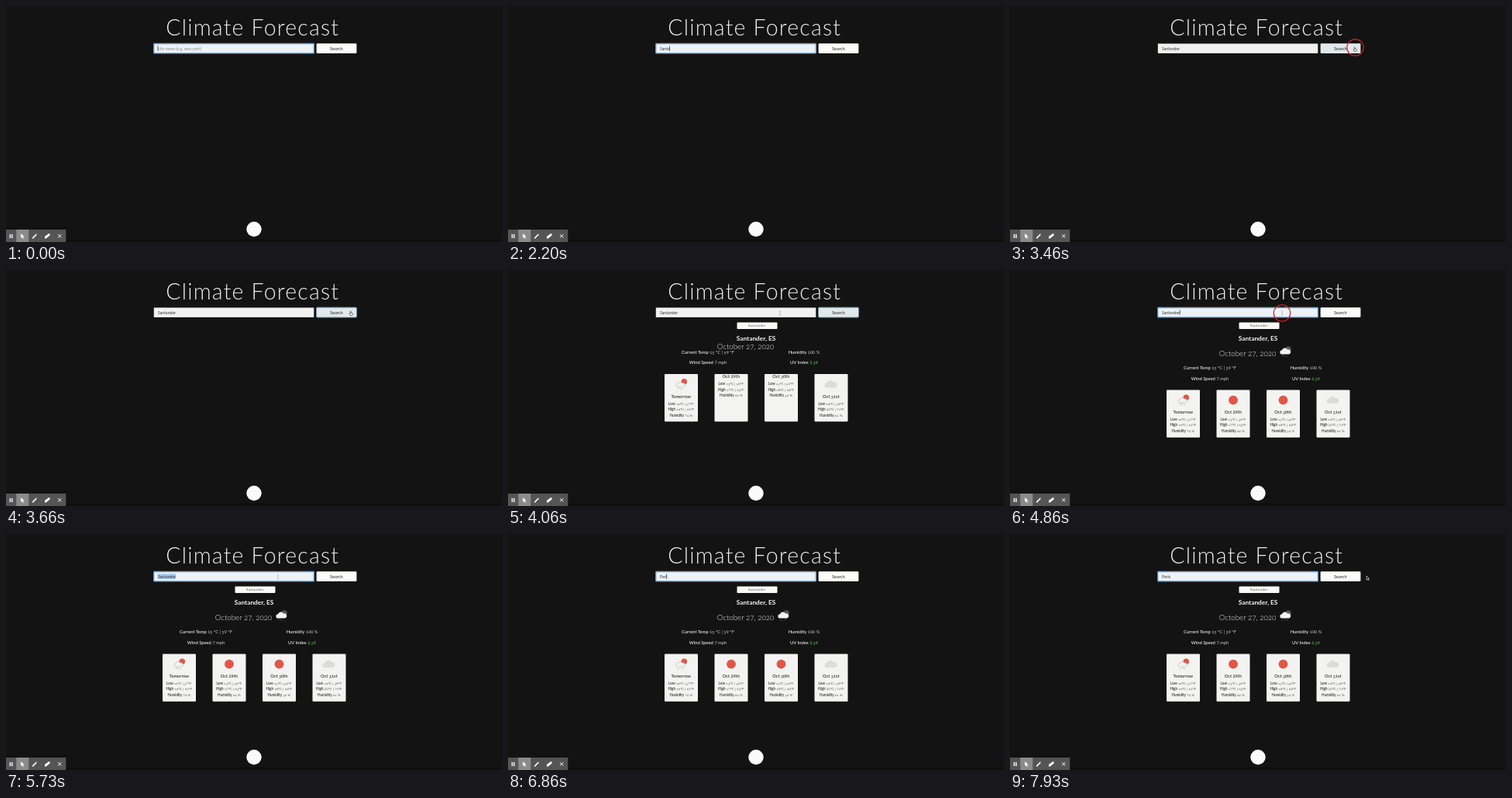
Write an HTML page that moves like this. It is 640 px wide and 304 px high and loops after 8 s.

```html
<!DOCTYPE html>
<html lang="en">
<head>
<meta charset="utf-8">
<title>Climate Forecast</title>
<style>
html, body { margin: 0; height: 100%; overflow: hidden; background: #121312; }
svg { display: block; width: 100vw; height: 100vh; font-family: Lato, "Open Sans", sans-serif; font-variant-numeric: oldstyle-nums; }
</style>
</head>
<body>
<svg id="stage" viewBox="0 0 640 304"></svg>
<script>
const LOOP = 8000;
const stage = document.getElementById('stage');
const pen = document.createElement('canvas').getContext('2d');

const typing = [
  [0, ''], [1130, 'S'], [1600, 'Sa'], [1800, 'San'], [2000, 'Sant'], [2200, 'Santa'],
  [2330, 'Santan'], [2400, 'Santand'], [2600, 'Santande'], [2730, 'Santander'],
  [6130, 'P'], [6400, 'Pa'], [6600, 'Par'], [6800, 'Pari'], [7000, 'Paris']
];
const caretOn = [[0, 200], [730, 3130], [4730, 5130], [6130, 7400]];
const clicks = [[3460, 3660, 445.5, 53.5], [4730, 5000, 351, 55.5], [5130, 5400, 351, 55.5]];
const path = [[2600, 489, 37], [2900, 474, 44], [3200, 448, 55], [3400, 445, 55.5],
  [3660, 445, 55.5], [4060, 351, 55.5], [7200, 351, 55.5], [7800, 461, 56], [8000, 461, 56]];
const days = [
  ['Tomorrow', '14ºC | 57ºF', '16ºC | 61ºF', 74],
  ['Oct 29th', '13ºC | 56ºF', '17ºC | 63ºF', 64],
  ['Oct 30th', '13ºC | 56ºF', '18ºC | 64ºF', 56],
  ['Oct 31st', '14ºC | 58ºF', '22ºC | 71ºF', 61]
];

const within = (t, [a, b]) => t >= a && t < b;
const latest = (list, t) => list.filter(k => k[0] <= t).pop();
const rect = (x, y, w, h, fill, more = '') =>
  `<rect x="${x}" y="${y}" width="${w}" height="${h}" fill="${fill}" ${more}/>`;
const circle = (x, y, r, fill, more = '') => `<circle cx="${x}" cy="${y}" r="${r}" fill="${fill}" ${more}/>`;
const text = (x, y, size, fill, body, more = 'text-anchor="middle"') =>
  `<text x="${x}" y="${y}" font-size="${size}" fill="${fill}" ${more}>${body}</text>`;
const pair = (label, value, fill) =>
  `<tspan font-weight="500">${label}</tspan> <tspan fill="${fill}">${value}</tspan>`;
const at = (x, y, body) => `<g transform="translate(${x} ${y})">${body}</g>`;
const shape = (d, fill, more = '') => `<path d="${d}" fill="${fill}" ${more}/>`;
const cloud = (fill, more) => shape('M-4.5 3.5a2.6 2.6 0 0 1 0-5.2a3.8 3.8 0 0 1 7-.8a3 3 0 0 1 2 6z', fill, more);

function rain(t, color) {
  let out = '';
  for (let i = 0; i < 3; i++) {
    const p = (t / 800 + i / 3) % 1, x = -3 + i * 3 - p, y = 3.8 + p * 2.4;
    out += shape(`M${x} ${y}l-.6 1.5`, 'none', `stroke="${color}" stroke-width=".7" opacity="${1 - p * .6}"`);
  }
  return out;
}

const showers = t => circle(4, -3.7, 3.8, '#df5748') +
  `<g transform="translate(-.5 .3) scale(.85)">${cloud('#f2f2f2', 'stroke="#aaa" stroke-width=".6"')}</g>` + rain(t, '#777');
const nightRain = t => circle(3.5, -3, 3.8, '#555') + cloud('#f4f4f4') + rain(t, '#999');
const sun = () => circle(.2, -.3, 5.9, '#df5748');
const overcast = () => `<g transform="scale(1.15)">${cloud('#dcdcdc')}</g>`;
const icons = [showers, sun, sun, overcast];

function card(i, t, top) {
  const [name, low, high, wet] = days[i];
  const loaded = t >= (i % 3 ? 4130 : 4000);
  const x = 202 + i * 64.5, mid = x + 21.3, y = top + (loaded ? 0 : -25.2);
  const row = (dy, label, value) => text(mid, y + dy, 4.6, '#222', pair(label, value, '#555'));
  return rect(x, top, 43, t < 4000 ? 47 : 61.3, '#f3f3f2', 'rx="1"') +
    (loaded ? at(mid, top + 13.5, icons[i](t)) : '') +
    text(mid, y + 30.6, 5.7, '#222', name, 'text-anchor="middle" font-weight="500"') +
    row(39.6, 'Low', low) + row(47, 'High', high) + row(54.6, 'Humidity', wet + ' %');
}

function results(t) {
  if (t < 3800) return '';
  const ready = t >= 4130, up = ready ? 0 : -20.4;
  const info = (x, y, label, value, fill = '#ccc') => text(x, y + up, 5.8, '#f4f4f4', pair(label, value, fill));
  return rect(295.5, 67.5, 52, 8.6, '#f8f8f7', 'rx="1"') +
    text(321.5, 73.3, 4.2, '#444', 'Santander', 'text-anchor="middle" letter-spacing=".5"') +
    text(320, 91.3, 8.3, '#f6f6f6', 'Santander, ES', 'text-anchor="middle" font-weight="700"') +
    text(306.5, ready ? 111 : 101.6, 9.7, '#eee', 'October 27, 2020', 'text-anchor="middle" font-weight="300"') +
    (ready ? at(355.5, 105, nightRain(t)) : '') +
    info(258, 128, 'Current Temp', '15 ºC | 59 ºF') + info(382, 128, 'Humidity', '100 %') +
    info(258, 141.8, 'Wind Speed', '7 mph') + info(382, 141.8, 'UV Index', '2.39', '#62d062') +
    days.map((d, i) => card(i, t, 154.4 + up)).join('');
}

function field(t) {
  const typed = latest(typing, t)[1];
  const focus = t < 3460 || t >= 4730;
  pen.font = '5.2px Lato, "Open Sans", sans-serif';
  const w = pen.measureText(typed).width;
  return rect(190.8, 48.5, 206.5, 12.4, focus ? '#f0f2f4' : '#f1f1ef', focus ? 'stroke="#6a9fd2" stroke-width="1.3" rx=".5"' : '') +
    (within(t, [5130, 6130]) ? rect(195.7, 51.3, w + .5, 6.8, '#a5c8ee') : '') +
    (typed ? text(196, 56.5, 5.2, '#333', typed, '') : text(196, 56.5, 5.2, '#888', 'city name (e.g. new york)', '')) +
    (focus && caretOn.some(s => within(t, s)) ? rect(195.7 + w, 51.5, .7, 6.4, '#222') : '');
}

function button(t) {
  const active = within(t, [3200, 4730]), ring = within(t, [3600, 4730]);
  return rect(400.6, 48.2, 51.8, 12.8, active ? '#e2e9ec' : '#fbfbfa',
    'rx="1.2"' + (ring ? ' stroke="#7b9cb0" stroke-width="1"' : '')) +
    text(426.4, 56.5, 5.7, '#222', 'Search');
}

const arrow = shape('M0 0V5L1.2 4 2 5.7 2.9 5.3 2.1 3.6H3.6Z', '#111', 'stroke="#eee" stroke-width=".6" transform="translate(-1 -2)"');
const hand = shape('M-.8 3L-2 .8Q-1.8 0-.8 1V-2.2Q-.2-3 .2-2.2V-.3L2.3.3V1.8L1.7 3Z', '#fff', 'stroke="#222" stroke-width=".6"');
const beam = shape('M-.8-2.6H.8M0-2.6V2.6M-.8 2.6H.8', 'none', 'stroke="#999" stroke-width=".6"');

function pointer(t) {
  if (t < 2600 || within(t, [6130, 7200])) return '';
  const a = latest(path, t), b = path[path.indexOf(a) + 1];
  const p = (t - a[0]) / (b[0] - a[0]), k = p * p * (3 - 2 * p);
  const x = a[1] + (b[1] - a[1]) * k, y = a[2] + (b[2] - a[2]) * k;
  const inside = y > 48 && y < 61;
  return at(x, y, inside && x < 397.5 ? beam : inside && x > 400 && x < 452 ? hand : arrow);
}

const line = (d, w) => shape(d, 'none', `stroke="#fff" stroke-width="${w}"`);
const fixed = rect(0, 0, 640, 304, '#121312') + rect(0, 300, 640, 4, '#0f0f0e') +
  text(206.2, 38, 28.5, '#eee', 'Climate Forecast', 'font-weight="300" letter-spacing="1.2"') +
  circle(320, 287.5, 9.7, '#fafafa') +
  rect(0, 288, 77.3, 16, '#555') + rect(13.3, 288, 16, 16, '#8b8b8b') +
  line('M5.4 294V299M7.9 294V299', 1.4) +
  shape('M19.3 293V299L20.7 297.8 21.8 300 22.8 299.5 21.8 297.3H23.7Z', '#fff') +
  line('M34.6 298.8L39.4 294', 1.7) + shape('M33.8 299.7l.4-1.8 1.4 1.4z', '#fff') +
  shape('M50 297L55 293.2 56.6 293.5V295.6L51.6 299.5H50Z', '#fff') +
  line('M67.2 294.2L71.4 298.4M71.4 294.2L67.2 298.4', 1);

function draw(now) {
  const t = now % LOOP;
  stage.innerHTML = fixed + field(t) + button(t) + results(t) + pointer(t) +
    clicks.filter(c => within(t, c)).map(c => circle(c[2], c[3], 10.7, 'none', 'stroke="#c9222c" stroke-width="1.2"')).join('');
  requestAnimationFrame(draw);
}
draw(0);
</script>
</body>
</html>
```
